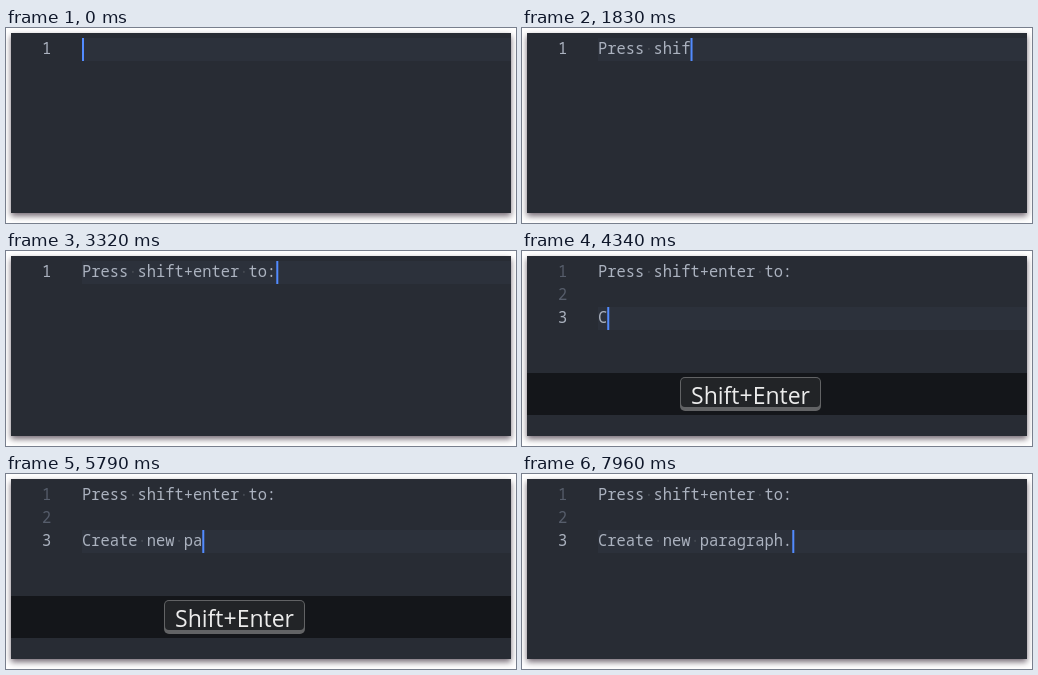
Recreate the animation shown at these times as an HTML page. Size 510 px wide and 195 px high, loop 8 s.

```html
<!DOCTYPE html>
<html lang="en">
<head>
<meta charset="utf-8">
<title>Editor typing</title>
<style>
  html, body { margin: 0; width: 100%; height: 100%; overflow: hidden; background: #fff; }
  #panel {
    position: absolute; left: 5px; top: 5px; width: 500px; height: 180px;
    background: #282c34; box-shadow: 0 3px 6px rgba(40, 25, 40, .65);
  }
  svg { position: absolute; left: 0; top: 0; }
  text { white-space: pre; }
  .code { font: 15.42px "Noto Sans Mono", "DejaVu Sans Mono", monospace; fill: #abb2bf; }
  .dots { fill: #434851; }
  .key { font: 23px "Open Sans", "Noto Sans", sans-serif; fill: #ececec; }
</style>
</head>
<body>
<div id="panel"></div>
<svg width="510" height="195" viewBox="0 0 510 195">
  <rect id="highlight" x="76" width="429" height="23" fill="#2c313b"/>
  <g id="lines" class="code"></g>
  <rect id="caret" width="2" height="23" fill="#528bff"/>
  <g id="keys">
    <rect x="5" y="122" width="500" height="42" fill="#14161a"/>
    <rect x="158" y="126" width="141" height="34" rx="5" fill="#626365"/>
    <rect x="159" y="127" width="139" height="29" rx="4" fill="#222427"/>
    <text class="key" x="228.5" y="153.3" text-anchor="middle">Shift+Enter</text>
  </g>
</svg>
<script>
const LOOP = 8000, LEFT = 76, TOP = 10, LINE = 23, ADVANCE = 9.252;
const FIRST = "Press shift+enter to:", LAST = "Create new paragraph.";
const KEYS_IN = 3870, NEW_PARAGRAPH = 3990, KEYS_OUT = 7960;

// Typing bursts: first keystroke, last keystroke, number of keystrokes
const bursts = [
  [180, 990, 6], [1310, 2230, 7], [2460, 2540, 2], [2670, 3320, 6],
  [4340, 4340, 1], [4590, 4840, 3], [4990, 5790, 9], [6010, 6010, 1], [6090, 7100, 7]
];
const strokes = bursts.flatMap(([from, to, count]) =>
  Array.from({ length: count }, (_, i) => from + (to - from) * i / Math.max(1, count - 1)));

const byId = id => document.getElementById(id);
const [highlight, lines, caret, keys] = ["highlight", "lines", "caret", "keys"].map(byId);

function addText(x, row, className = "") {
  const node = document.createElementNS("http://www.w3.org/2000/svg", "text");
  node.setAttribute("x", x);
  node.setAttribute("y", TOP + row * LINE + 16);
  node.setAttribute("class", className);
  return lines.appendChild(node);
}

const rows = [0, 1, 2].map(row => ({
  number: addText(36, row),
  dots: addText(LEFT, row, "dots"),
  code: addText(LEFT, row)
}));

function draw(t) {
  const typed = strokes.filter(s => s <= t + 0.01).length;
  const active = t < NEW_PARAGRAPH ? 0 : 2;
  const content = [FIRST.slice(0, typed), "", LAST.slice(0, Math.max(0, typed - FIRST.length))];

  rows.forEach(({ number, dots, code }, i) => {
    number.textContent = i <= active ? i + 1 : "";
    number.style.fill = i === active ? "#abb2bf" : "#565d6b";
    code.textContent = content[i];
    dots.textContent = content[i].replace(/./g, c => c === " " ? "·" : "\u00a0");
  });

  const y = TOP + active * LINE;
  highlight.setAttribute("y", y);
  caret.setAttribute("y", y);
  caret.setAttribute("x", LEFT + content[active].length * ADVANCE);
  keys.style.opacity = t < KEYS_OUT ? Math.min(1, Math.max(0, (t - KEYS_IN + 40) / 160)) * (t >= KEYS_IN) : 0;
}

const start = performance.now();
function frame() {
  draw((performance.now() - start) % LOOP);
  requestAnimationFrame(frame);
}
frame();
</script>
</body>
</html>
```
